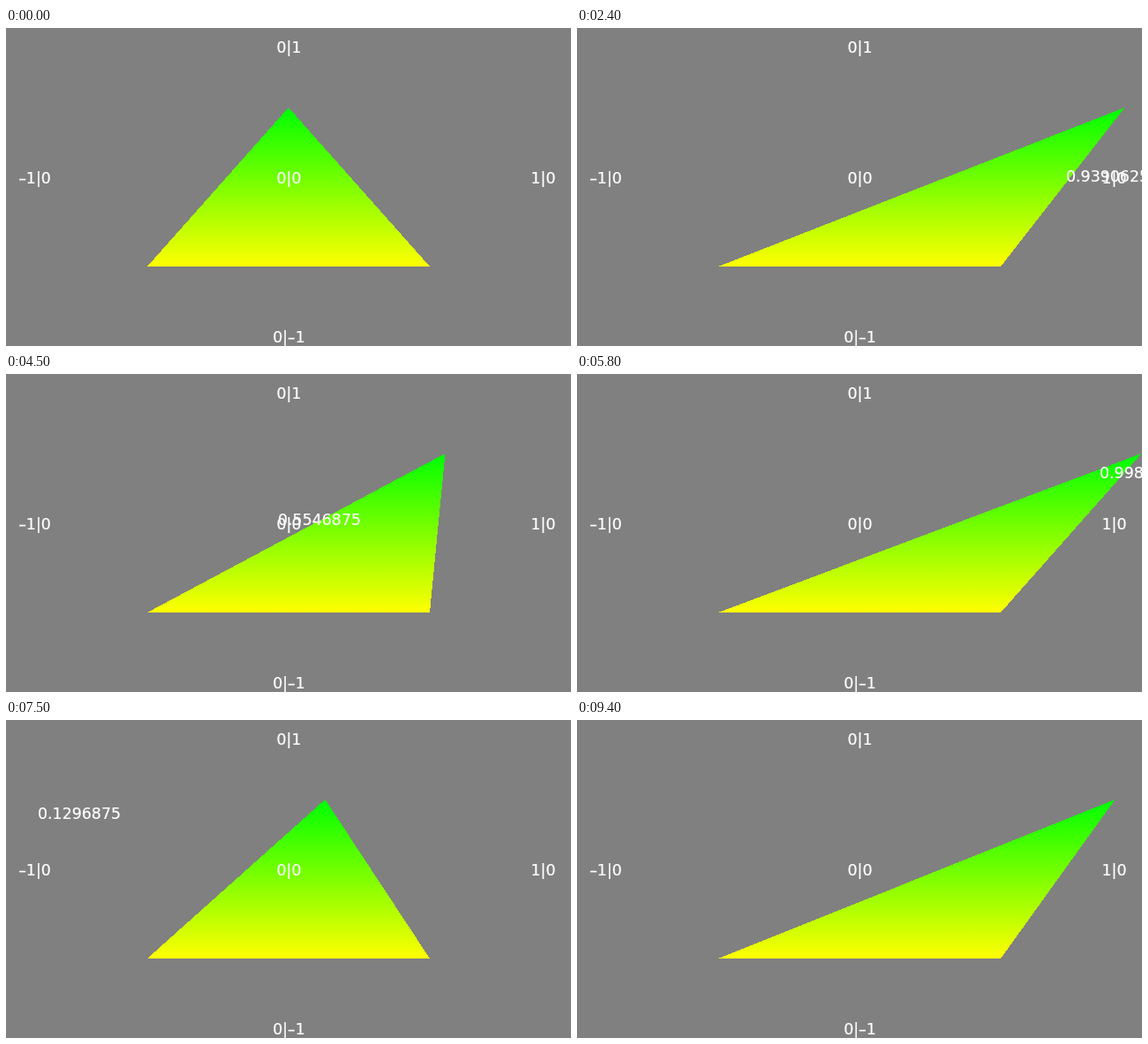
An HTML page for the animation above (10 s loop, 640x360 px).

```html
<!DOCTYPE html>
<html lang="en">
<head>
<meta charset="utf-8">
<title>Pointer-driven triangle</title>
<style>
  html, body { margin: 0; width: 100%; height: 100%; overflow: hidden; background: #808080; }
  svg { display: block; width: 640px; height: 360px; }
  text {
    font: 17.4px "DejaVu Sans", sans-serif;
    fill: #fff; stroke: #fff; stroke-width: .2px;
    text-anchor: middle;
  }
</style>
</head>
<body>
<svg viewBox="0 0 640 360">
  <defs>
    <linearGradient id="fade" x2="0" y2="1">
      <stop stop-color="#0f0"/>
      <stop offset="1" stop-color="#ff0"/>
    </linearGradient>
  </defs>
  <polygon id="triangle" fill="url(#fade)" shape-rendering="crispEdges"/>
  <text x="320.5" y="28">0|1</text>
  <text x="32.5" y="176">–1|0</text>
  <text x="320.5" y="176">0|0</text>
  <text x="608.5" y="176">1|0</text>
  <text x="320.5" y="356">0|–1</text>
  <text id="readout"></text>
</svg>
<script>
const WIDTH = 640, LOOP = 10000, TICK = 100, ENTER = 100;
const triangle = document.getElementById('triangle');
const readout = document.getElementById('readout');

// The pointer rests between sweeps; each one eases to a new resting point.
const entry = { x: 312, y: 188 };
const sweeps = [
  { from: 300, to: 700, x: 334, y: 183 },
  { from: 800, to: 2100, x: 613, y: 168 },
  { from: 2300, to: 3400, x: 97, y: 179 },
  { from: 3700, to: 5300, x: 612, y: 150 },
  { from: 5500, to: 5800, x: 639, y: 112 },
  { from: 6700, to: 7500, x: 83, y: 106 },
  { from: 7600, to: 9400, x: 579, y: -20 }
];

const clamp = u => Math.min(1, Math.max(0, u));
const smooth = u => u * u * (3 - 2 * u);
const mix = (a, b, k) => a + (b - a) * k;

function pointerAt(time) {
  let { x, y } = entry;
  for (const sweep of sweeps) {
    const k = smooth(clamp((time - sweep.from) / (sweep.to - sweep.from)));
    x = mix(x, sweep.x, k);
    y = mix(y, sweep.y, k);
  }
  return { x: Math.round(x), y: Math.round(y) };
}

function draw(now) {
  const time = Math.floor((now % LOOP) / TICK) * TICK;
  const inside = time >= ENTER;
  const pointer = inside ? pointerAt(time) : { x: 0, y: 0 };
  const value = pointer.x / WIDTH;
  const apex = WIDTH / 2 * (1 + value);

  triangle.setAttribute('points', `160,270 480,270 ${apex},90`);
  readout.textContent = inside ? value : '';
  readout.setAttribute('x', pointer.x);
  readout.setAttribute('y', pointer.y + 6);
}

const start = performance.now();
function frame() {
  draw(performance.now() - start);
  requestAnimationFrame(frame);
}
frame();
</script>
</body>
</html>
```
